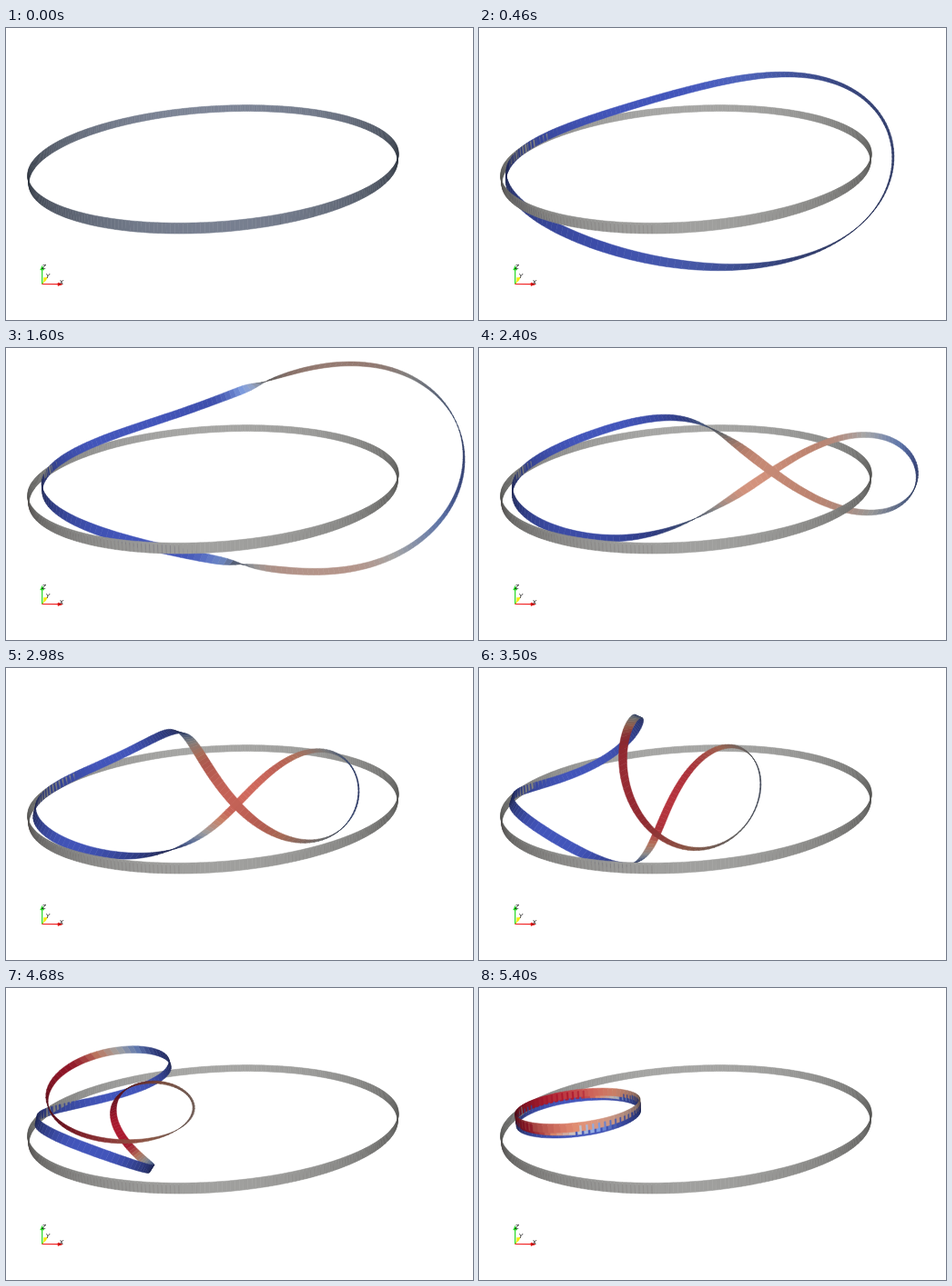
An HTML page with a canvas for the animation above (5.42 s loop, 513 by 321 pixels).

```html
<!DOCTYPE html>
<html lang="en">
<head>
<meta charset="utf-8">
<title>Folding ring</title>
<style>
html, body { margin: 0; width: 513px; height: 321px; overflow: hidden; background: #fff; }
canvas { display: block; }
</style>
</head>
<body>
<canvas id="stage" width="513" height="321"></canvas>
<script>
const ctx = document.getElementById('stage').getContext('2d');
const LOOP = 5420, STEP = 20;
const RING = 360, RIBBON = 200, HALF_WIDTH = .0243, SCALE = 191;

const mix = (a, b, k) => a + (b - a) * k;
const ease = (from, to, v) => {
  const k = Math.min(1, Math.max(0, (v - from) / (to - from)));
  return k * k * (3 - 2 * k);
};
const add = (a, b, k = 1) => a.map((v, i) => v + b[i] * k);
const cross = (a, b) => [a[1] * b[2] - a[2] * b[1], a[2] * b[0] - a[0] * b[2], a[0] * b[1] - a[1] * b[0]];
const size = a => Math.hypot(...a) || 1e-9;

// The band's centre line is a sum of harmonics, symmetric about the x axis:
// x uses cos(p), cos(3p); y and z use sin(p), sin(2p), sin(3p).
const poses = [
  // time, x1, x3, y1, y2, y3, z1, z2, z3
  [20, 1, 0, 1, 0, 0, 0, 0, 0],
  [960, 1.105, .03, .62, .1, 0, .437, -.198, .017],
  [1600, 1.13, .06, .28, .195, .03, .455, -.185, .025],
  [2400, 1.06, .075, .13, .37, 0, .09, .116, -.064],
  [2980, .8, .09, -.12, .51, .1, .194, .121, -.136],
  [4000, .31, .215, -.1, .526, 0, .27, .07, -.22],
  [5400, 0, 1 / 3, 0, 0, 1 / 3, 0, 0, 0]
];

function harmonics(t) {
  let i = 0;
  while (i < poses.length - 2 && t > poses[i + 1][0]) i++;
  const a = poses[i], b = poses[i + 1];
  const before = poses[Math.max(0, i - 1)], after = poses[Math.min(poses.length - 1, i + 2)];
  const dt = b[0] - a[0], k = (t - a[0]) / dt, k2 = k * k, k3 = k2 * k;
  const [x1, x3, ...side] = a.slice(1).map((v, n) => {
    const end = b[n + 1];
    const m0 = (end - before[n + 1]) / (b[0] - before[0]) * dt;
    const m1 = (after[n + 1] - v) / (after[0] - a[0]) * dt;
    return (2 * k3 - 3 * k2 + 1) * v + (k3 - 2 * k2 + k) * m0 + (3 * k2 - 2 * k3) * end + (k3 - k2) * m1;
  });
  // Scale the sideways part so that the band keeps its length.
  const energy = side.reduce((sum, v, n) => sum + ((n % 3 + 1) * v) ** 2, 0);
  const fit = Math.sqrt((2 - x1 * x1 - 9 * x3 * x3) / energy);
  return { x1, x3, side: side.map(v => v * fit) };
}

function centreLine(t) {
  const { x1, x3, side } = harmonics(t);
  const wave = (p, from) => [1, 2, 3].reduce((sum, n) => sum + side[from + n - 1] * Math.sin(n * p), 0);
  return Array.from({ length: RIBBON }, (_, i) => {
    const p = 2 * Math.PI * i / RIBBON;
    return [x1 + x3 - 1 - x1 * Math.cos(p) - x3 * Math.cos(3 * p), wave(p, 0), wave(p, 3)];
  });
}

// The strip bends about its width, so the width follows the smoothed binormal.
function widths(line) {
  const at = i => line[(i + RIBBON) % RIBBON];
  const bend = line.map((p, i) => {
    const q = at(i + 1), r = at(i - 1);
    return cross(add(q, r, -1), add(add(q, r), p, -2));
  });
  return line.map((_, i) => {
    let sum = [0, 0, 0];
    for (let j = -5; j <= 5; j++) sum = add(sum, bend[(i + j + RIBBON) % RIBBON]);
    return sum.map(v => v / size(sum) * HALF_WIDTH);
  });
}

const depth = ([, y, z]) => 1 + .29 * y - .097 * z;
function project(p) {
  const [x, y, z] = p, d = depth(p);
  return [238.4 + (SCALE * x + 34.4 * y) / d, 135 - (60.5 * y + 181 * z) / d];
}

// One piece of a strip, with how squarely it faces the viewer.
function piece(p, q, wp, wq, paint) {
  const corners = [add(p, wp), add(q, wq), add(q, wq, -1), add(p, wp, -1)].map(project);
  const [a, b, , d] = corners;
  const area = Math.abs((b[0] - a[0]) * (d[1] - a[1]) - (b[1] - a[1]) * (d[0] - a[0]));
  const far = (depth(p) + depth(q)) / 2;
  const real = size(add(q, p, -1)) * 2 * HALF_WIDTH * SCALE * SCALE;
  return { corners, far, ...paint(Math.min(1, area * far * far / real)) };
}

const rgb = c => `rgb(${c.map(Math.round)})`;
const WARM = [[59, 76, 192], [141, 176, 254], [221, 221, 221], [244, 154, 123], [180, 4, 38]];
function warm(h, shade) {
  const i = Math.min(3, Math.floor(h * 4));
  return rgb(WARM[i].map((v, c) => mix(v, WARM[i + 1][c], h * 4 - i) * shade));
}

function hue(u, t) {
  const peak = .1 + .52 * ease(950, 1650, t) + .34 * ease(1600, 4100, t);
  const end = .12 + .5 * ease(2980, 4000, t);
  return mix(mix(.04, peak, ease(.38, .56, u)), end, ease(.68, 1, u));
}

function ribbon(t) {
  const line = centreLine(t), wide = widths(line);
  const lift = .022 * ease(4400, 5400, t);
  const share = i => 1 - Math.abs(1 - 2 * i / RIBBON);
  const stacked = line.map((p, i) => add(p, [0, 0, lift * (2 * share(i) - 1)]));
  return stacked.map((p, i) => {
    const j = (i + 1) % RIBBON;
    return piece(p, stacked[j], wide[i], wide[j],
      facing => ({ fill: warm(hue(share(i + .5), t), .38 + .54 * facing) }));
  });
}

const MARKS = [294, 303];
const UP = [0, 0, HALF_WIDTH];
function ring(plain) {
  const point = i => {
    const th = 2 * Math.PI * i / RING;
    return [Math.cos(th), Math.sin(th), 0];
  };
  return Array.from({ length: RING }, (_, i) => {
    const p = point(i), meshed = p[1] < .2 && Math.abs(p[0] - .2) > .13 && p[0] > -.9 && p[0] < .9;
    return piece(p, point(i + 1), UP, UP, facing => plain
      ? { fill: rgb([44 + 82 * facing, 51 + 83 * facing, 61 + 90 * facing]), edge: MARKS.includes(i) && 'rgba(30,34,42,.8)' }
      : { fill: rgb([82, 82, 80].map(v => v + 84 * facing)), edge: meshed && 'rgba(80,70,70,.35)' });
  });
}

function polygon(points, fill) {
  ctx.beginPath();
  points.forEach(p => ctx.lineTo(...p));
  ctx.closePath();
  ctx.fillStyle = ctx.strokeStyle = fill;
  ctx.lineWidth = .5;
  ctx.fill();
  ctx.stroke();
}

function line(x1, y1, x2, y2, colour, width) {
  ctx.strokeStyle = colour;
  ctx.lineWidth = width;
  ctx.beginPath();
  ctx.moveTo(x1, y1);
  ctx.lineTo(x2, y2);
  ctx.stroke();
}

function drawPiece({ corners, fill, edge }) {
  polygon(corners, fill);
  if (!edge) return;
  const [top, , , low] = corners;
  line(top[0], mix(top[1], low[1], .2), low[0], low[1], edge, .6);
}

function drawAxes() {
  line(40, 281, 45, 274, '#e8e000', 1.2);
  line(39.7, 281.5, 39.7, 264, '#20d820', 1.2);
  line(39.5, 281.5, 61, 281.7, '#f02020', 1.2);
  polygon([[37.7, 266], [39.7, 261.5], [41.8, 266]], '#20d820');
  polygon([[57, 280], [62, 281.8], [57, 283.4]], '#e01010');
  polygon([[41.5, 274.5], [45, 274.5], [43.5, 278], [41.5, 278.5]], '#f4ec10');
  ctx.fillStyle = '#111';
  ctx.font = 'italic 7px "Liberation Sans", Arial, sans-serif';
  ctx.fillText('X', 58.5, 282);
  ctx.fillText('Y', 43.5, 275);
  ctx.fillText('Z', 39.5, 264.5);
}

function draw(t) {
  ctx.fillStyle = '#fff';
  ctx.fillRect(0, 0, 513, 321);
  const plain = t < STEP;
  const pieces = plain ? ring(true) : [...ring(false), ...ribbon(t)];
  pieces.sort((a, b) => b.far - a.far).forEach(drawPiece);
  drawAxes();
}

function frame() {
  draw(Math.floor(performance.now() % LOOP / STEP) * STEP);
  requestAnimationFrame(frame);
}
frame();
</script>
</body>
</html>
```
